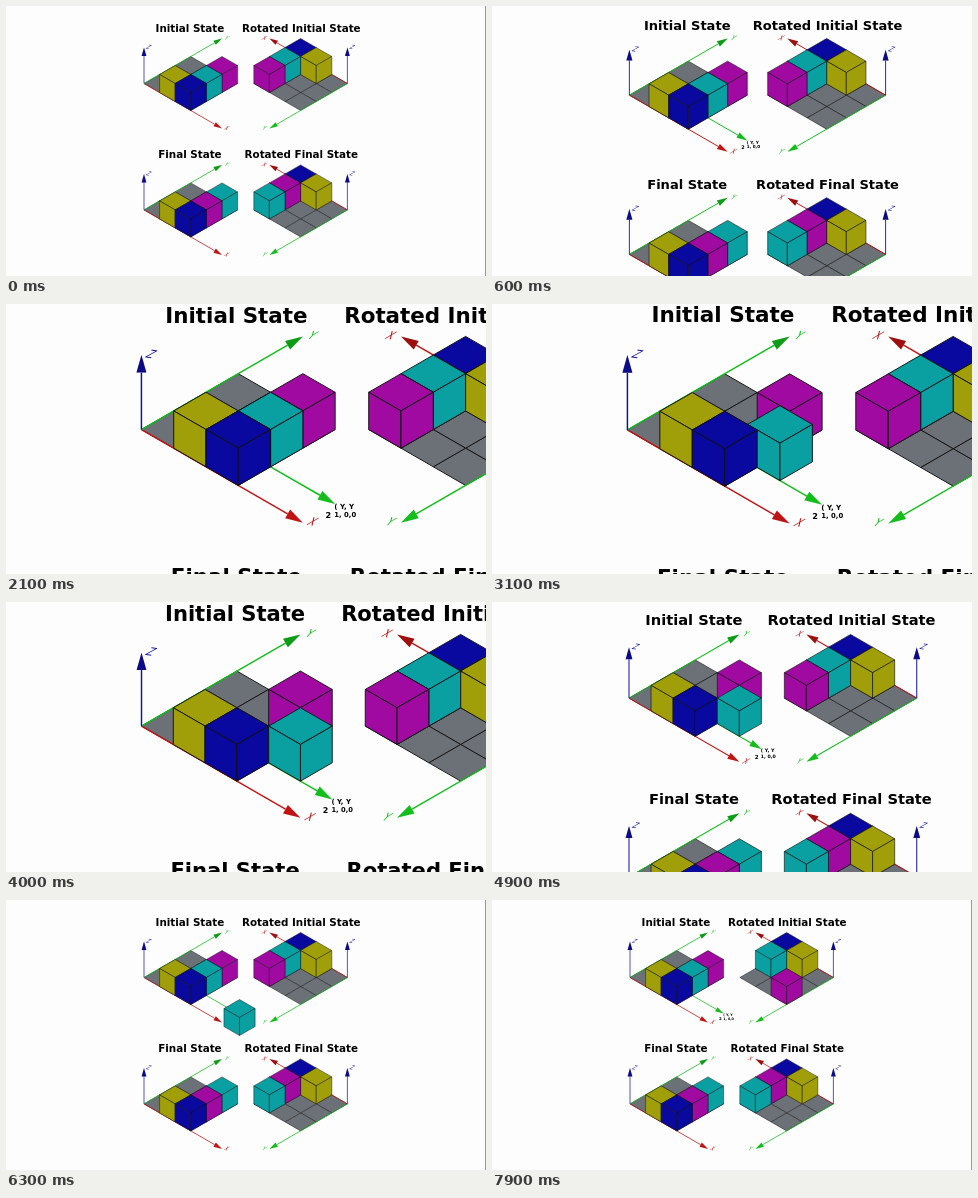
Write an HTML page with a canvas that moves like this. It is 480 by 270 pixels and loops after 8 s.

```html
<!DOCTYPE html>
<html lang="en">
<head>
<meta charset="utf-8">
<title>Sliding cubes</title>
<style>
html, body { margin: 0; width: 100%; height: 100%; overflow: hidden; background: #fdfdfd; }
canvas { display: block; width: 480px; height: 270px; }
</style>
</head>
<body>
<canvas id="stage" width="480" height="270"></canvas>
<script>
const ctx = document.getElementById('stage').getContext('2d');
const FONT = '"DejaVu Sans", sans-serif';
const DX = 15.6, DY = 9, DZ = 18;       // half width, half depth and height of a cube
const ZOOM = 2.08, FOCUS = [140.4, 32.6];
const RED = '#c01414', GREEN = '#12bd1c', BLUE = '#0e0ea6';
const YELLOW = '#a09f0a', NAVY = '#0909a0', CYAN = '#0a9fa0', MAGENTA = '#a00aa0', GRAY = '#6c7077';

const ramp = (t, from, to) => Math.min(1, Math.max(0, (t - from) / (to - from)));

function poly(points, fill) {
  ctx.beginPath();
  points.forEach(p => ctx.lineTo(...p));
  ctx.closePath();
  ctx.fillStyle = fill;
  ctx.fill();
  ctx.strokeStyle = '#111';
  ctx.lineWidth = 0.45;
  ctx.stroke();
}

function diamond(x, y, color) {
  poly([[x - DX, y], [x, y - DY], [x + DX, y], [x, y + DY]], color);
}

// x, y: centre of the cube's base
function cube(x, y, color) {
  const side = w => poly([[x + w, y - DZ], [x, y + DY - DZ], [x, y + DY], [x + w, y]], color);
  diamond(x, y - DZ, color);
  side(-DX);
  side(DX);
}

function arrow([x0, y0], [x1, y1], color) {
  const len = Math.hypot(x1 - x0, y1 - y0), head = 8.5;
  ctx.save();
  ctx.translate(x1, y1);
  ctx.rotate(Math.atan2(y1 - y0, x1 - x0));
  ctx.strokeStyle = ctx.fillStyle = color;
  ctx.lineWidth = 0.7;
  ctx.beginPath();
  ctx.moveTo(-len, 0);
  ctx.lineTo(-head, 0);
  ctx.stroke();
  ctx.beginPath();
  ctx.moveTo(0, 0);
  ctx.lineTo(-head, -2.4);
  ctx.lineTo(-head, 2.4);
  ctx.fill();
  if (y1 < y0) {                        // heads pointing away lie in shade
    ctx.fillStyle = 'rgba(0, 0, 0, 0.18)';
    ctx.fill();
  }
  ctx.restore();
}

function text(str, x, y, size, weight = 'bold', color = '#000', align = 'left') {
  ctx.font = `${weight} ${size}px ${FONT}`;
  ctx.textAlign = align;
  ctx.fillStyle = color;
  ctx.fillText(str, x, y);
}

function axisLabel(letter, x, y, color) {
  ctx.save();
  ctx.transform(0.8, 0.12, -0.75, 0.85, x, y);
  text(letter, 0, 2.2, 6, 'normal', color, 'center');
  ctx.restore();
}

// dir 1: seen from the front, -1: turned by 180 degrees
function view(title, ox, oy, dir, cubes, push) {
  const at = (x, y, z = 0) => [ox + dir * DX * (x + y), oy + dir * DY * (x - y) - DZ * z];
  const origin = at(0, 0);
  text(title, ox + dir * 46 - 0.1, oy - 51.7, 10.35, 'bold', '#000', 'center');
  for (let x = 0; x < 3; x++)
    for (let y = 0; y < 3; y++) diamond(...at(x + 0.5, y + 0.5), GRAY);

  [['X', at(5, 0), RED, dir], ['Y', at(0, 5), GREEN, dir], ['Z', at(0, 0, 2), BLUE, 1]]
    .forEach(([letter, tip, color, side]) => {
      arrow(origin, tip, color);
      axisLabel(letter, tip[0] + side * 4.8, tip[1] - 0.6, color);
    });

  if (push) {
    arrow(at(3, 1), at(5, 1), GREEN);
    text('( Y, Y', 231.2, 115.9, 3.4);
    text('2', 226.9, 120.2, 3.9);
    text('1, 0,0', 231.2, 119.7, 3.3);
  }
  cubes.sort((a, b) => dir * (a[0] - a[1] - b[0] + b[1]))
    .forEach(([x, y, color]) => cube(...at(x + 0.5, y + 0.5), color));
}

function draw(t) {
  const zoom = 1 + (ZOOM - 1) * (ramp(t, 0.12, 2.12) - ramp(t, 3.94, 5.5));
  const cyanX = t < 5.6 ? 2 + ramp(t, 2.4, 3.4) : 2;
  const magentaX = 2 - 2 * ramp(t, 6.8, 7.7);
  const base = () => [[1, 0, YELLOW], [2, 0, NAVY]];
  const swapped = () => [...base(), [2, 1, MAGENTA], [2, 2, CYAN]];

  ctx.setTransform(1, 0, 0, 1, 0, 0);
  ctx.fillStyle = '#fdfdfd';
  ctx.fillRect(0, 0, 480, 270);
  ctx.setTransform(zoom, 0, 0, zoom, FOCUS[0] * (1 - zoom), FOCUS[1] * (1 - zoom));
  ctx.lineJoin = 'round';

  view('Initial State', 138, 77.5, 1,
    [...base(), [cyanX, 1, CYAN], [2, 2, MAGENTA]], t >= 0.1);
  view('Rotated Initial State', 341.4, 77.5, -1,
    [...base(), [2, 1, CYAN], [magentaX, 2, MAGENTA]]);
  view('Final State', 138, 203.9, 1, swapped());
  view('Rotated Final State', 341.4, 203.9, -1, swapped());

  // the loose cube drops away past the arrow
  if (t >= 5.6 && t < 6.5) {
    const k = (t - 5.6) / 0.7;
    cube(216 + 17.5 * k, 95.5 + 31 * k, CYAN);
  }
  ctx.fillStyle = '#999';
  ctx.fillRect(479, -300, 1, 900);
}

function frame() {
  draw(performance.now() % 8000 / 1000);
  requestAnimationFrame(frame);
}
frame();
</script>
</body>
</html>
```
